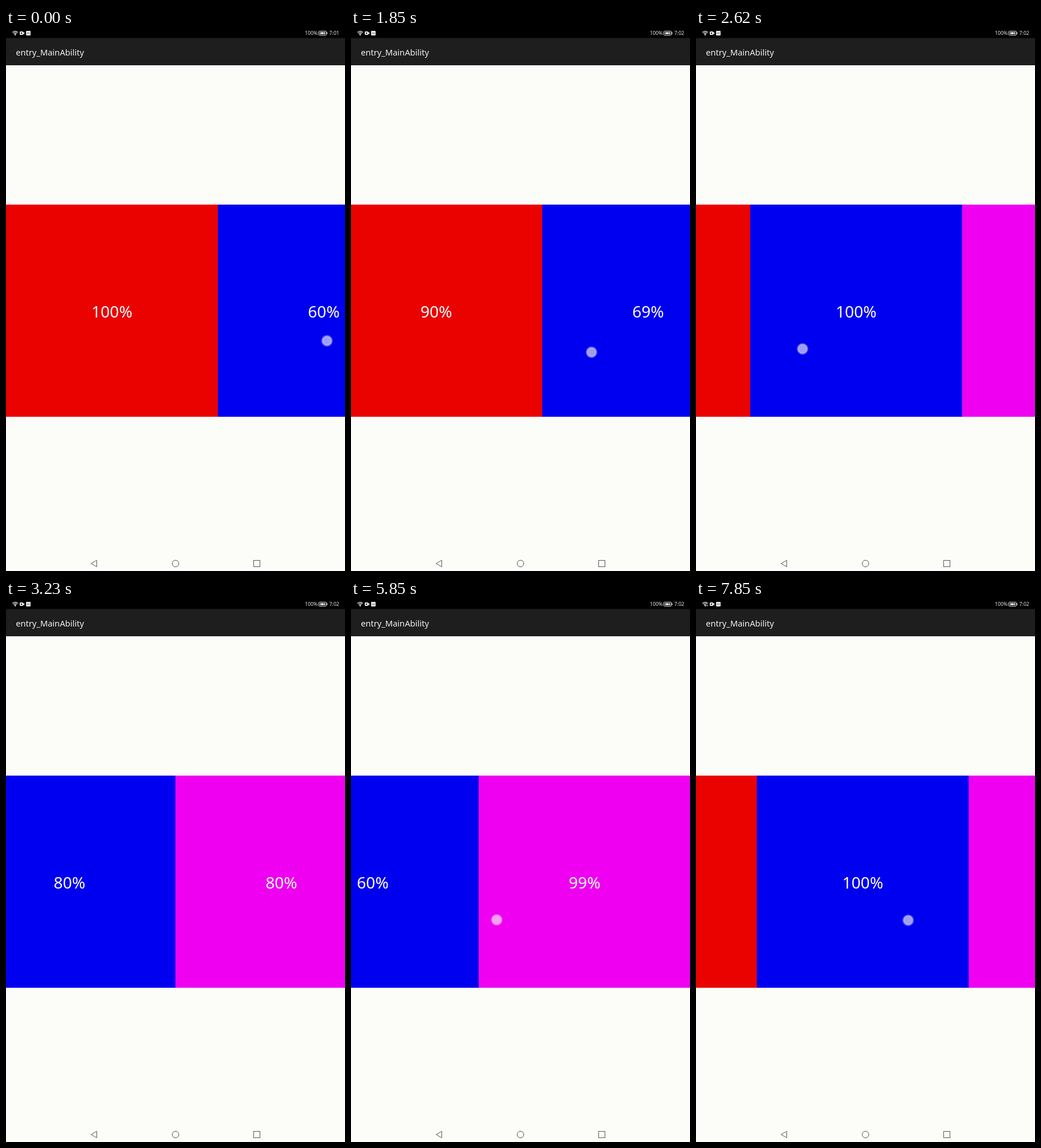
These frames come from a looping animation (592 by 947 pixels, 8 s). An HTML page with a canvas:

```html
<!DOCTYPE html>
<html lang="en">
<head>
<meta charset="utf-8">
<title>Visible area</title>
<style>
html, body { margin: 0; width: 100%; height: 100%; overflow: hidden; background: #fcfdf9; }
canvas { display: block; width: 592px; height: 947px; }
</style>
</head>
<body>
<canvas id="stage" width="592" height="947"></canvas>
<script>
const c = document.getElementById('stage').getContext('2d');
const LOOP = 8000, STEP = 2000 / 13;
const VIEW = 592, SIZE = 370, TOP = 308;
const COLORS = ['#ea0200', '#0000f0', '#ef00f1'];
const FONT = '"Noto Sans", "Open Sans", sans-serif';
const LIGHT = '#e8e8e8';

const DRAG_START = 1730, DRAG_SPEED = 0.311, RELEASE = 2900;
const SCROLL_END = 517.2, FRICTION = 446;
const RETURN_START = 7228, RETURN_SPEED = 0.41;

// Each finger stroke is a straight line between two moments.
const stroke = (t0, x0, y0, t1, x1, y1) => ({ t0, x0, y0, t1, x1, y1 });
const STROKES = [
  stroke(0, 560, 545, 170, 574, 545),
  stroke(1700, 464, 566, 2900, 99, 557),
  stroke(5535, 361, 559, 6160, 146, 559),
  stroke(7200, 135, 559, 8000, 426, 560)
];

// Drag left, fling with friction to the end, then drag back.
function scrollAt(t) {
  const drag = DRAG_SPEED * (Math.min(t, RELEASE) - DRAG_START);
  if (t < RELEASE) return Math.max(0, drag);
  const fling = SCROLL_END - (SCROLL_END - drag) * Math.exp((RELEASE - t) / FRICTION);
  return Math.min(fling, SCROLL_END - RETURN_SPEED * (t - RETURN_START));
}

function rect(x, y, w, h, color) {
  c.fillStyle = color;
  c.fillRect(x, y, w, h);
}

function text(str, x, y, size, color, align = 'left') {
  c.font = size + 'px ' + FONT;
  c.textAlign = align;
  c.fillStyle = color;
  c.fillText(str, x, y);
}

function circle(x, y, r) {
  c.beginPath();
  c.arc(x, y, r, 0, Math.PI * 2);
}

// Isosceles triangle pointing left.
function triangle(x, y, w, h) {
  c.beginPath();
  c.moveTo(x, y);
  c.lineTo(x + w, y - h / 2);
  c.lineTo(x + w, y + h / 2);
  c.closePath();
}

function box(x, y, w, h, r) {
  c.beginPath();
  c.roundRect(x, y, w, h, r);
}

function wifi(busy) {
  c.strokeStyle = c.fillStyle = LIGHT;
  c.lineWidth = 1.1;
  for (let r = 2.6; r < 7; r += 2.1) {
    c.beginPath();
    c.arc(16, 12.4, r, -Math.PI * 0.76, -Math.PI * 0.24);
    c.stroke();
  }
  circle(16, 11.9, 1.1);
  c.fill();
  if (busy) {
    rect(17.3, 9, 4, 4.5, '#000');
    rect(18, 10.6, 2.6, 1.6, LIGHT);
  }
}

function statusBar(t) {
  rect(0, 0, VIEW, 17.5, '#000');
  wifi(t > 6500);

  c.fillStyle = LIGHT;
  box(24, 6, 6, 6, 1);
  c.fill();
  triangle(29, 9, 3, 5);
  c.fill();
  rect(26, 8, 2, 2, '#000');

  c.fillStyle = LIGHT;
  box(35, 5, 8, 8, 1.2);
  c.fill();
  text('vpn', 39, 10, 3.6, '#333', 'center');

  text('100%', 522, 12.4, 8.7, LIGHT);
  text(t < 900 ? '7:01' : '7:02', 564.6, 12.4, 8.7, LIGHT);

  c.strokeStyle = '#ddd';
  c.lineWidth = 1;
  box(546, 5.5, 13.5, 7, 1.5);
  c.stroke();
  rect(547.5, 7, 10.5, 4, '#8c8c8c');
  rect(560.2, 7.5, 1.2, 3, '#ddd');
  c.fillStyle = '#fff';
  triangle(549, 9, 4, 4);
  c.fill();
  rect(553, 8.5, 4, 1, '#fff');
}

function navBar() {
  c.strokeStyle = '#565656';
  c.lineWidth = 1;
  triangle(148.5, 934, 10, 11.4);
  c.stroke();
  circle(296, 934, 5.8);
  c.stroke();
  c.strokeRect(432.5, 928.5, 11, 11);
}

function panels(scroll) {
  COLORS.forEach((color, i) => {
    const x = i * SIZE - scroll;
    const seen = Math.min(VIEW, x + SIZE) - Math.max(0, x);
    const pct = Math.max(0, Math.floor(seen / SIZE * 100 + 0.1));
    // Reaching to the right border keeps the seams closed.
    rect(x, TOP, VIEW - Math.min(x, VIEW), SIZE, color);
    text(pct + '%', x + SIZE / 2, 505, 28, '#fff', 'center');
  });
}

function touch(t) {
  const s = STROKES.find(k => t >= k.t0 && t <= k.t1);
  if (!s) return;
  const p = (t - s.t0) / (s.t1 - s.t0);
  const x = s.x0 + (s.x1 - s.x0) * p + 0.5;
  const y = s.y0 + (s.y1 - s.y0) * p + 0.5;
  const glow = c.createRadialGradient(x, y, 6, x, y, 11);
  glow.addColorStop(0, 'rgba(255,255,255,.62)');
  glow.addColorStop(0.3, 'rgba(255,255,255,.72)');
  glow.addColorStop(0.55, 'rgba(255,255,255,.35)');
  glow.addColorStop(1, 'rgba(255,255,255,0)');
  c.fillStyle = glow;
  circle(x, y, 11);
  c.fill();
}

function draw(t) {
  rect(0, 0, VIEW, 947, '#fcfdf9');
  rect(0, 17, VIEW, 48, '#1e1e1f');
  text('entry_MainAbility', 17.2, 48, 14.6, '#f2f2f2');
  statusBar(t);
  panels(scrollAt(t));
  navBar();
  touch(t);
}

// The picture advances 6.5 times per second.
const start = performance.now();
function tick() {
  const t = (performance.now() - start) % LOOP;
  draw(Math.min(51, Math.floor((t + 5) / STEP)) * STEP);
  requestAnimationFrame(tick);
}
tick();
</script>
</body>
</html>
```
